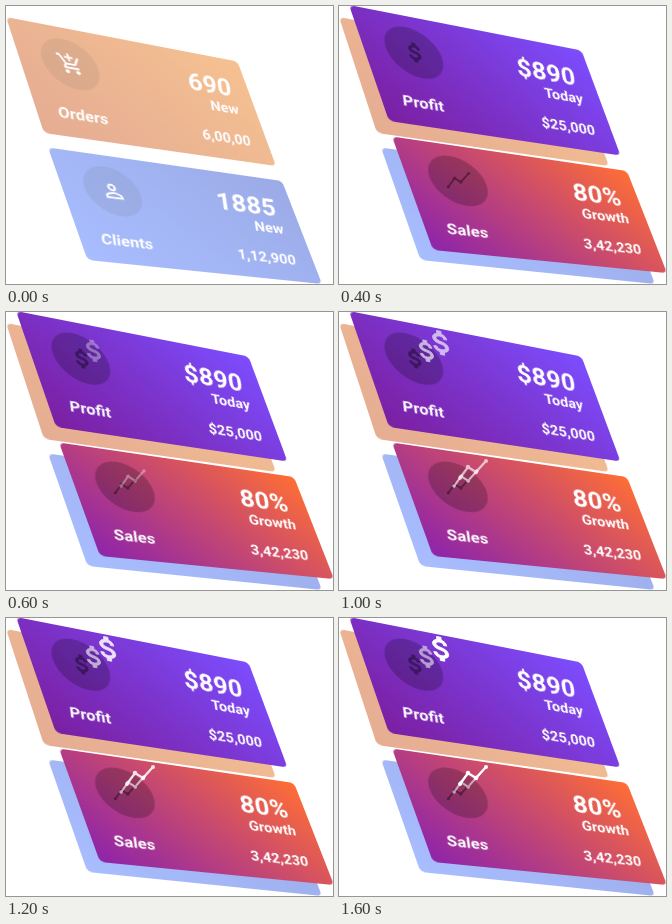
Recreate the animation shown at these times as an HTML page. Size 327 by 278 pixels, loop 4600 ms.

```html
<!DOCTYPE html>
<html lang="en">
<head>
<meta charset="utf-8">
<title>Dashboard cards</title>
<style>
  html, body { margin: 0; width: 100%; height: 100%; overflow: hidden; background: #fff; }
  body { position: relative; }
  svg { position: absolute; left: 0; top: 0; }
  .card { width: 240px; height: 120px; border-radius: 5px; transform-origin: 0 0; }
  text { font: 600 16px Roboto, sans-serif; fill: #fff; }
  .big { font-size: 28px; }
  .end { text-anchor: end; }
</style>
</head>
<body>
<script>
const CART = `<g fill="#fff"><path d="M11 9h2V6h3V4h-3V1h-2v3H8v2h3z"/>
  <circle cx="7" cy="20" r="2"/><circle cx="17" cy="20" r="2"/></g>
  <path d="M1 3h2.6l4.3 9h7.6q.8 0 1.2-.7l3.8-6.8M7.6 12l-1.5 2.7q-.6 1.3 1 1.3H19" fill="none" stroke="#fff" stroke-width="2"/>`;
const PERSON = `<path d="M5 19v-2c0-1.8 4.3-3 7-3s7 1.2 7 3v2z" fill="none" stroke="#fff" stroke-width="2"/>
  <circle cx="12" cy="8" r="3" fill="none" stroke="#fff" stroke-width="2"/>`;

// Corners run clockwise from the top left.
const cards = [
  { corners: [0, 11, 231.5, 55.5, 270, 160, 38, 127], colors: "#d67b52, #f09c50", icon: CART, shade: .11,
    label: "Orders", value: "690", note: "New", total: "6,00,00" },
  { corners: [42, 141.5, 276, 175, 316, 278, 81.5, 254], colors: "#7496ff, #6078d8", icon: PERSON, shade: .11,
    label: "Clients", value: "1885", note: "New", total: "1,12,900" },
  { corners: [10, -1, 242.5, 44.5, 281.5, 149.5, 50, 115], colors: "#7b1fa2, #7c4dff", icon: "", shade: .22, front: true,
    label: "Profit", value: "$890", note: "Today", total: "$25,000" },
  { corners: [53, 130.5, 288, 165, 328, 267, 94, 244], colors: "#8e24aa, #ff6e35", icon: "", shade: .22, front: true,
    label: "Sales", value: "80%", note: "Growth", total: "3,42,230" }
];

// Perspective matrix that maps a 240 x 120 box onto four corners.
function project([x0, y0, x1, y1, x2, y2, x3, y3]) {
  const ax = x1 - x2, ay = y1 - y2, bx = x3 - x2, by = y3 - y2;
  const sx = x0 - x1 + x2 - x3, sy = y0 - y1 + y2 - y3;
  const det = ax * by - bx * ay;
  const g = (sx * by - bx * sy) / det, h = (ax * sy - sx * ay) / det;
  const across = [x1 - x0 + g * x1, y1 - y0 + g * y1, 0, g].map(v => v / 240);
  const down = [x3 - x0 + h * x3, y3 - y0 + h * y3, 0, h].map(v => v / 120);
  return `matrix3d(${[...across, ...down, 0, 0, 1, 0, x0, y0, 0, 1].map(v => v.toFixed(8))})`;
}

// Letters lean less than the card they sit on.
const line = (str, x, y, cls = "") =>
  `<text class="${cls}" transform="translate(${x} ${y}) skewX(-12)">${str}</text>`;

const cardSvg = c => `<svg class="card ${c.front ? "front" : "back"}" viewBox="0 0 240 120"
  style="background:linear-gradient(45deg, ${c.colors});transform:${project(c.corners)}">
  <circle cx="49.5" cy="40" r="27.3" fill="rgba(0,0,0,${c.shade})"/>
  <g transform="translate(37 27.5) scale(1.04)">${c.icon}</g>
  ${line(c.label, 19.5, 100.5)}
  ${line(c.value, 218, 44.5, "big end")}
  ${line(c.note, 218.5, 65, "end")}
  ${line(c.total, 219, 100.5, "end")}</svg>`;

const icon = (name, x, y, scale) => `<use href="#${name}" transform="translate(${x} ${y}) scale(${scale})"/>`;

document.body.innerHTML = cards.map(cardSvg).join("") + `
<svg class="front" width="327" height="278" viewBox="0 0 327 278">
  <defs>
    <path id="dollar" transform="matrix(1.04 .185 .16 .95 0 0) translate(-11.2 -12)" stroke="currentColor" stroke-width=".6"
      d="M11.8 10.9c-2.27-.59-3-1.2-3-2.15 0-1.09 1.01-1.85 2.7-1.85 1.78 0 2.44.85 2.5 2.1h2.21c-.07-1.72-1.12-3.3-3.21-3.81V3h-3v2.16c-1.94.42-3.5 1.68-3.5 3.61 0 2.31 1.91 3.46 4.7 4.13 2.5.6 3 1.48 3 2.41 0 .69-.49 1.79-2.7 1.79-2.06 0-2.87-.92-2.98-2.1h-2.2c.12 2.19 1.76 3.42 3.68 3.83V21h3v-2.15c1.95-.37 3.5-1.5 3.5-3.55 0-2.84-2.43-3.81-4.7-4.4z"/>
    <g id="chart">
      <path d="M-13 8L-5 -3L3 2L13 -9" fill="none" stroke="currentColor" stroke-width="2.4"/>
      <g fill="currentColor"><circle cx="-13" cy="8" r="2"/><circle cx="-5" cy="-3" r="2.2"/>
      <circle cx="3" cy="2" r="2.2"/><circle cx="13" cy="-9" r="2"/></g>
    </g>
  </defs>
  <g opacity=".38" color="#000" fill="#000">${icon("dollar", 75.5, 46.5, 1.1)}${icon("chart", 119.5, 174.5, .78)}</g>
  <g id="mid" color="#fff" fill="#fff">${icon("dollar", 87, 38.8, 1.24)}${icon("chart", 126.5, 167, .88)}</g>
  <g id="top" color="#fff" fill="#fff">${icon("dollar", 101.2, 30.8, 1.4)}${icon("chart", 134, 158, 1)}</g>
</svg>`;

const find = q => [...document.querySelectorAll(q)];
const backs = find(".back"), fronts = find(".front");
const [midLayer] = find("#mid"), [topLayer] = find("#top");

const STEP = 200, LOOP = 4600;
const midAlpha = [0, 0, 0, .35, .65, .65, .62, .58, .55];
const topAlpha = [0, 0, 0, 0, .4, .65, .85, .95, 1];

function draw(now) {
  const step = Math.min(8, Math.floor(now % LOOP / STEP));
  backs.forEach(el => el.style.opacity = step === 1 ? .88 : .63);
  fronts.forEach(el => el.style.visibility = step < 2 ? "hidden" : "visible");
  midLayer.style.opacity = midAlpha[step];
  topLayer.style.opacity = topAlpha[step];
}

const start = performance.now();
function tick() {
  draw(performance.now() - start);
  requestAnimationFrame(tick);
}
tick();
</script>
</body>
</html>
```
